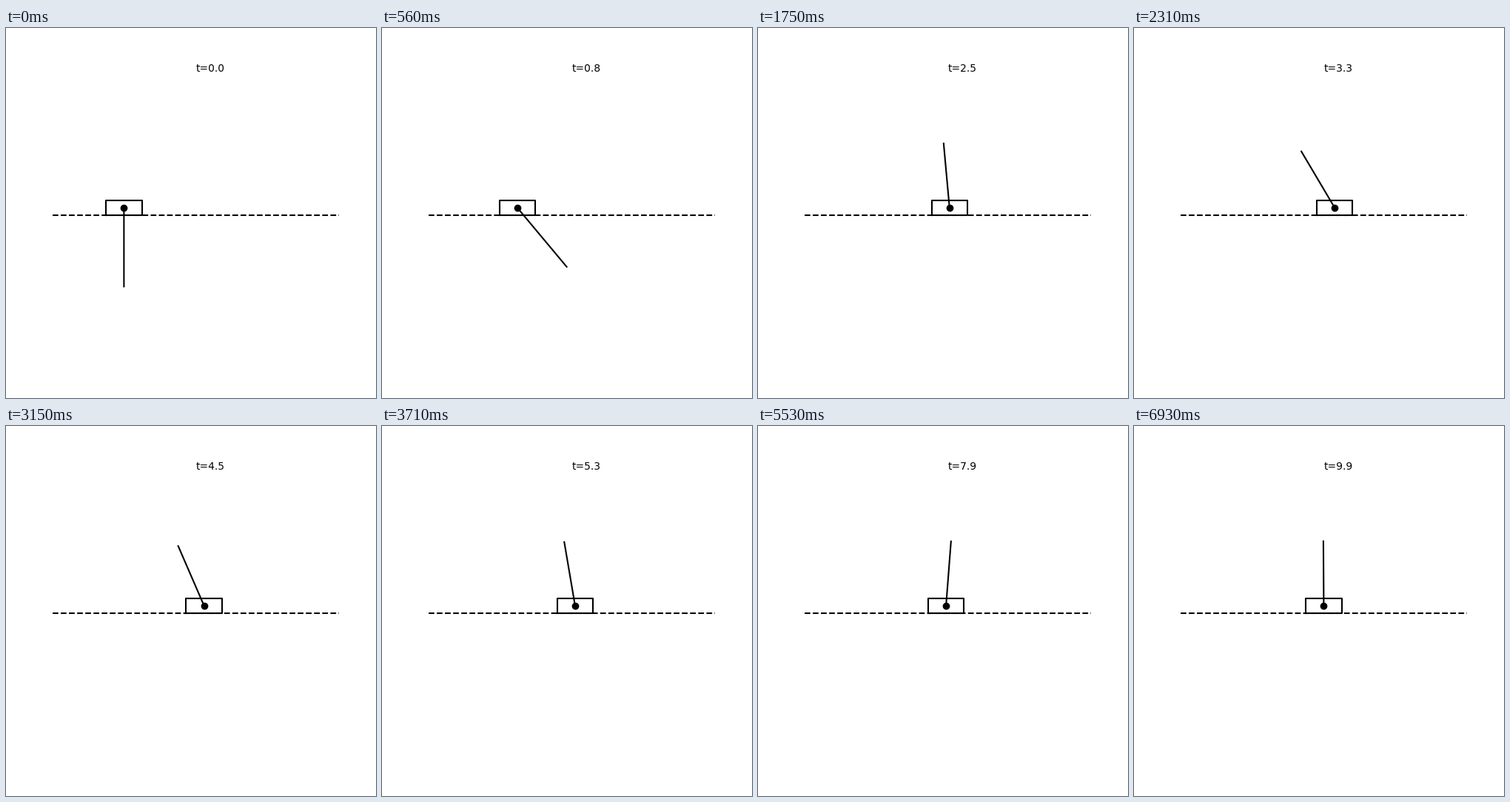
Recreate the animation shown at these times as a matplotlib script. Size 500x500 px, loop 7000 ms.

```python
import math

import matplotlib.pyplot as plt
from matplotlib.animation import FuncAnimation

FRAMES = 100
DT = 0.1
LEAD = 0.01  # the pose runs one fine step ahead of the clock
CART_W, CART_H = 0.5, 0.2

fig = plt.figure(figsize=(5, 5), dpi=100, facecolor="white")
ax = fig.add_axes([0.125, 0.11, 0.775, 0.77])
half = 2 * 385 / 387.5
ax.set_xlim(-2, 2)
ax.set_ylim(-half + 1e-4, half + 1e-4)
ax.axis("off")

ax.plot([-2, 2], [0, 0], "k--", lw=1.5)
cart, = ax.plot([], [], "k-", lw=1.5)
pole, = ax.plot([], [], "k-", lw=1.5)
pivot, = ax.plot([], [], "ko", ms=6)
clock = ax.text(0, 2, "", fontsize=10, family="DejaVu Sans")


def cart_x(t):
    """Step response of x'' = -x - x', released at rest from x = -1."""
    w = math.sqrt(3) / 2
    return -math.exp(-t / 2) * (math.cos(w * t) + math.sin(w * t) / (2 * w))


def update(i):
    t = i * DT
    x = cart_x(t + LEAD)
    angle = math.pi * (1 + x)  # hangs at x = -1, upright at x = 0
    left, right = x - CART_W / 2, x + CART_W / 2
    mid = CART_H / 2
    cart.set_data([left, right, right, left, left],
                  [0, 0, CART_H, CART_H, 0])
    pole.set_data([x, x + math.sin(angle)], [mid, -math.cos(angle)])
    pivot.set_data([x], [mid])
    clock.set_text(f"t={t:.1f}")
    return cart, pole, pivot, clock


anim = FuncAnimation(fig, update, frames=FRAMES, interval=70,
                     repeat=True, repeat_delay=0, blit=False)
plt.show()
```
